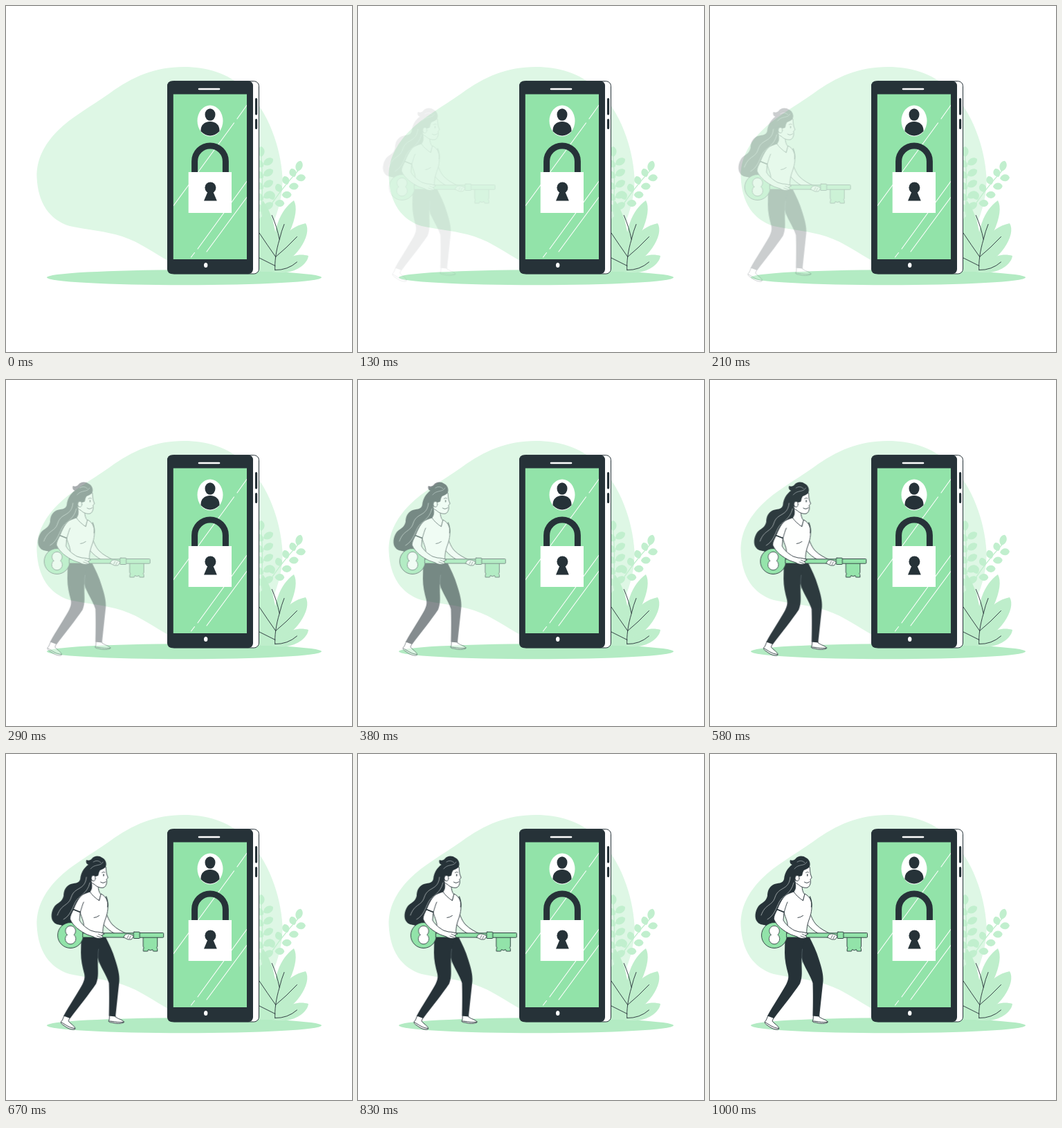
An HTML page with a canvas that plays this animation: 500 px wide and 500 px high, repeating every 1.04 s.

```html
<!DOCTYPE html>
<html lang="en">
<head>
<meta charset="utf-8">
<title>Unlocking a phone</title>
<style>
html, body { margin: 0; width: 100%; height: 100%; overflow: hidden; background: #fff; }
canvas { display: block; width: 500px; height: 500px; }
</style>
</head>
<body>
<canvas id="stage"></canvas>
<script>
const SIZE = 500, LOOP = 1040, FPS = 24;
const DARK = '#263238', GREEN = '#92e3a9', WHITE = '#fff';
const ratio = Math.max(1, window.devicePixelRatio || 1);

function layer(canvas) {
  canvas.width = canvas.height = SIZE * ratio;
  const c = canvas.getContext('2d');
  c.scale(ratio, ratio);
  c.lineCap = c.lineJoin = 'round';
  return c;
}

const stage = layer(document.getElementById('stage'));
const scene = layer(document.createElement('canvas'));
const woman = layer(document.createElement('canvas'));
let g;

function paint(path, fill, stroke, width = 0.9) {
  if (fill) { g.fillStyle = fill; g.fill(path); }
  if (stroke) { g.strokeStyle = stroke; g.lineWidth = width; g.stroke(path); }
}
const shape = (d, fill, stroke, width) => paint(new Path2D(d), fill, stroke, width);
const line = (d, color = DARK, width = 0.9) => shape(d, null, color, width);

function oval(x, y, rx, ry, fill, stroke, width) {
  const p = new Path2D();
  p.ellipse(x, y, rx, ry, 0, 0, Math.PI * 2);
  paint(p, fill, stroke, width);
}

function box(x, y, w, h, r, fill, stroke, width) {
  const p = new Path2D();
  p.roundRect(x, y, w, h, r);
  paint(p, fill, stroke, width);
}

// A small leaf growing from (x, y) at an angle in degrees.
function leaf(x, y, angle, len, half, color) {
  g.save();
  g.translate(x, y);
  g.rotate(angle * Math.PI / 180);
  shape(`M0 0C${len * 0.25} ${-half * 1.5} ${len * 0.85} ${-half * 1.4} ${len} 0` +
        `C${len * 0.85} ${half * 1.4} ${len * 0.25} ${half * 1.5} 0 0Z`, color);
  g.restore();
}

function drawPlants() {
  const pale = '#c1efce', mid = '#beeecb';
  line('M364 322Q378 287 422 238', pale, 1.2);
  line('M366 318Q374 262 368 212', pale, 1.2);
  leaf(421, 239, -72, 16, 4.6, pale);
  for (let i = 0; i < 4; i++) {
    const x = 417 - i * 10.2, y = 247 + i * 11;
    leaf(x, y, -112, 13, 4.6, pale);
    leaf(x + 2, y + 2 + i, -5 + i * 2, 14, 4.6, pale);
  }
  leaf(369, 218, -92, 15, 4.5, pale);
  for (let i = 0; i < 5; i++) {
    const y = 229 + i * 16;
    leaf(372, y, -30, 16, 4.6, pale);
    leaf(372, y + 3, -145, 14, 4.6, pale);
  }
  shape('M389 384C396 332 385 299 371 281C369 289 369 298 370 304L355 318V384Z', mid);
  shape('M388 362C384 325 396 295 416 281C421 290 419 306 410 326C405 341 397 355 390 366Z', mid);
  shape('M388 378C386 349 403 320 433 314C438 322 435 336 425 350C415 364 399 376 388 380Z', mid);
  shape('M386 384C398 367 418 355 437 361C436 372 421 383 405 385Z', mid);
  line('M388.8 381.5C388 371 390 354 395.2 337.5C393 326 389 313 384.3 302.5');
  line('M395.2 337.5Q398 325 402 315.5');
  line('M389.7 362.5Q378 346 366 328');
  line('M389.7 362.5Q405 350 420.5 333.5');
  line('M389 375.5L366 364');
  line('M388.8 381.5Q407 382 420.5 370');
}

function drawPhone() {
  box(236, 108.7, 129.5, 278.3, 7, WHITE, DARK, 1);
  box(233, 108.3, 124, 279, 7, DARK);
  box(241.8, 127.5, 106.2, 238.5, 0, GREEN);
  line('M279 120H308', WHITE, 2.6);
  oval(288.7, 374.5, 2.7, 3.6, WHITE);
  line('M361.6 134.5V156M361.6 164.5V176.5', DARK, 3.2);

  g.save();
  g.beginPath();
  g.rect(242, 127.5, 106, 238.5);
  g.clip();
  line('M349 142L334 163M329.5 169L241 290M349 252L277 351M272.5 356.5L267.5 363M349 275L290 355', WHITE, 1.1);
  g.restore();

  oval(295, 166, 18.5, 22.5, WHITE);
  oval(295, 157, 7.5, 8.8, DARK);
  shape('M281.5 181C281 172 287 167 295 167S309 172 308.5 181Q302 187.5 295 187.5T281.5 181Z', DARK);

  g.lineCap = 'butt';
  line('M272.6 241V224.5A22.4 22.6 0 0 1 317.4 224.5V241', DARK, 9);
  g.lineCap = 'round';
  box(263.7, 240, 62.3, 59, 0, WHITE);
  oval(295.4, 262.5, 8, 8, DARK);
  shape('M292.5 266H298.3L304.8 281.5H286Z', DARK);
}

function drawScene() {
  g = scene;
  g.fillStyle = WHITE;
  g.fillRect(0, 0, SIZE, SIZE);
  shape('M257 88C215 88 183 102 150 126C120 147 95 160 75 180C55 200 44 222 44.5 247' +
        'C46 285 63 309 92 318C120 324 143 325 168 333C195 342 215 358 235 368.5L300 388' +
        'C365 382 402 300 399.5 247C397 205 380 153 345 119C320 97 290 88 257 88Z', '#def7e5');
  oval(257.5, 392.3, 198.5, 11, '#b3ebc3');
  drawPlants();
  drawPhone();
}

function drawKey() {
  oval(93, 262, 18.5, 18.5, GREEN, DARK);
  shape('M88 261.2A7.4 7.4 0 1 1 98 261.2A7.7 7.7 0 1 1 88 261.2Z', WHITE, DARK, 0.8);
  shape('M198 264V278Q200 280 198.2 282V285H204.5L205.5 282.5Q208.5 285 211.5 282.5L212.5 285H218.5V281.5Q216.5 280 218.5 278V264Z', GREEN, DARK);
  box(111, 258.8, 74, 6.2, 0, GREEN, DARK);
  box(192, 258.5, 35.5, 6.7, 1, GREEN, DARK);
  box(184, 257.2, 9, 9.3, 1, GREEN, DARK);
}

function drawWoman() {
  g = woman;
  // long hair
  shape('M124 158C114 161 108 170 107 181C105 188 98 186 92 188.5C85 192 83 199 83 205' +
        'C81 214 74 215 70 220C65 227 64 237 68 242C71 247 76 246 81 248C87 249 94 246 98 240' +
        'C102 233 99 227 105 218C112 209 124 207 127 194L132 170Z', DARK);
  line('M116 178C114 198 99 191 94 207C90 220 80 216 74 233M121 186C117 203 105 204 100 214C95 224 93 233 83 239', '#c9d0d0', 0.7);

  // far arm
  shape('M143 226C146 234 149 242 154 247C160 253 168 257 175 260L170 265C157 261 146 254 139 244Z', WHITE, DARK);

  // shoes and ankles
  shape('M84 378L81 385C78 387 79 390 83 392C88 396 94 399 99 398C101 396 98 393 94 390L90 386L92.5 380Z', WHITE, DARK);
  line('M79.5 387.5C86 391 91 396 99.5 396.5');
  shape('M149.5 377L149 384C147 387 149 388 153 388C159 390 166 390 170 388C171 385 164 384 158 380L157.5 377Z', WHITE, DARK);
  line('M148.5 386C156 386 162 389 170 387');

  // trousers
  shape('M131 263H143C149 275 154 285 157.5 297C161.5 309 164 319 163.5 328L158 379.5L148.5 378.5' +
        'C149 361 149 343 148.5 331C145 319 136 308 132 294Z', DARK);
  shape('M108.5 263H139C134 276 132 288 132.5 302C132.5 313 134 322 130 332C120 347 106 364 92.5 382L83 378.5' +
        'C92 362 103 346 109 335C113 328 114 323 113 318C110 307 108 298 108 287Z', DARK);
  line('M133.5 282Q131.8 294 134 302', '#65747a', 0.6);

  // neck and shirt
  shape('M123 185C125 193 123 198 119 201L134 213L137 203C134 200 133 195 133 190Z', WHITE, DARK);
  shape('M121 199C116 201 112 202 109.5 204C103 210 100 218 97 225L107 229C109 237 113 243 112 250L111 262H140' +
        'C139 253 141 245 144 237C147 229 148 219 146 212C144 207 141 204 137 202L134.5 212C129 208 124 204 121 199Z', WHITE, DARK);
  line('M107 229C109 223 110 218 112 214M127 236.5Q130.5 236.5 134.5 233.5');
  line('M144.5 206Q148 215 146.5 221', DARK, 1.2);

  // face
  shape('M124 168C125 164 135 160 144 163C145 168 144 172 147 178C147.3 180 145 180.5 145 181' +
        'C146 185 145 191 141 193C136 194 131 192 127 188C123 187 121 182 123 178Z', WHITE, DARK);
  line('M136.5 185Q140 188 144 184.5');
  line('M140.8 174V176', DARK, 1.3);
  line('M138.5 171.5Q140.5 169.5 142.5 171', DARK, 0.8);
  shape('M124.5 162C130 167 136 166 139 164C136 167 134 170 133.5 174C133 178 129.5 175 127 179L124 184C118 178 118 168 124.5 162Z', DARK);
  oval(126, 179.5, 3, 4, WHITE, DARK, 0.8);
  shape('M117 176C113 169 114 162 119 160C115.5 159 115 155.5 116 153C119 154.5 122 153.5 124 151' +
        'C127 147 134 146 139 150C145 153 146 161 143 164C137 169 129 169 122 175Z', DARK);
  line('M122 166C128 158 137 163 140 156M126 156Q132 152 137 157', '#aeb8bb', 0.65);

  drawKey();

  // far hand
  shape('M172 261C175 259 179 260 183 262L184 264L181 268L176 268L170 265Z', WHITE, DARK, 0.8);
  line('M177 262L175 266M180 263L178 267', DARK, 0.7);

  // near arm and hand
  shape('M97 225C94 231 92 235 92.5 239C97 249 107 256 117 261L126 264C130 267 136 267 140 265' +
        'L138 262L142 260C139 258 133 257 129 257L122 255C115 251 109 246 106 240L107 229Z', WHITE, DARK);
  line('M97 224.5L107 228.5', DARK, 1.5);
  line('M133 260L139 263M131 263L137 265', DARK, 0.7);
}

function pose(ms) {
  const rise = Math.min(1, (ms - 83) / 520);
  const sway = ms > 625 ? 2.2 * Math.sin(Math.PI * (ms - 625) / 400) : 0;
  return { alpha: Math.max(0, rise), x: -0.5 - 31.5 * (1 - rise) + sway };
}

// The motion advances in 24 steps per second, on a clock of 10 ms.
const stepStart = k => Math.round(k * 100 / FPS) * 10;

function render(ms) {
  let k = 0;
  while (stepStart(k + 1) <= ms) k++;
  stage.globalAlpha = 1;
  stage.drawImage(scene.canvas, 0, 0, SIZE, SIZE);
  if (k < 3) return;
  const p = pose(k * 1000 / FPS);
  stage.globalAlpha = p.alpha;
  stage.drawImage(woman.canvas, p.x, 0, SIZE, SIZE);
}

drawScene();
drawWoman();
const start = performance.now();
function tick() {
  render((performance.now() - start) % LOOP);
  requestAnimationFrame(tick);
}
tick();
</script>
</body>
</html>
```
